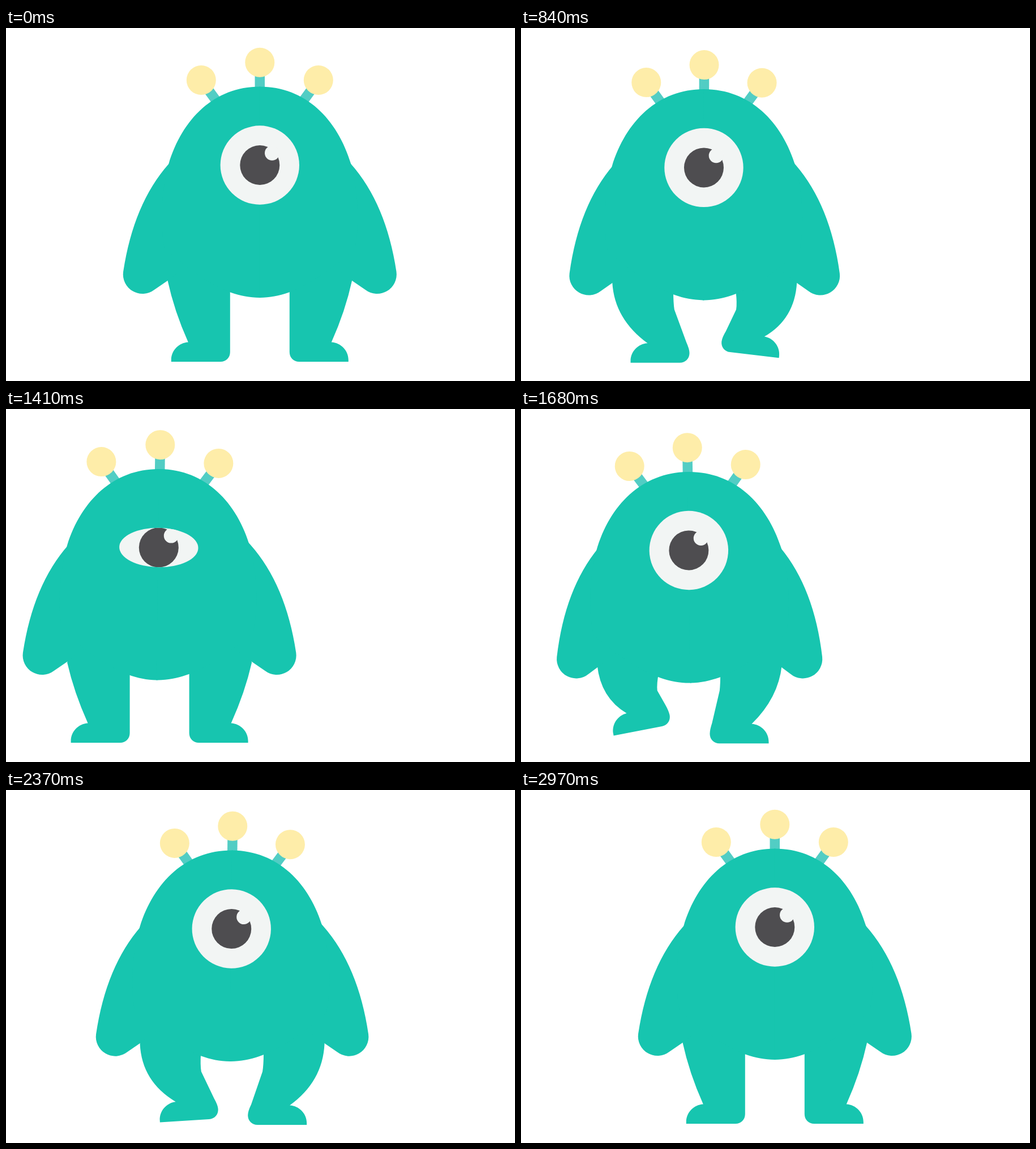
Animation of 899 by 623 pixels, one loop 3600 ms. Source, as an HTML page with a canvas:

```html
<!DOCTYPE html>
<html>
<head>
<meta charset="utf-8">
<style>
html, body { margin: 0; width: 100%; height: 100%; overflow: hidden; background: #fff; }
canvas { display: block; }
</style>
</head>
<body>
<canvas id="stage" width="899" height="623"></canvas>
<script>
const ctx = document.getElementById('stage').getContext('2d');
const GREEN = '#17c5af', STALK = '#52cdc4', BULB = '#feeda9', WHITE = '#f2f5f4', DARK = '#4e4d50';
const TAU = Math.PI * 2, DEG = Math.PI / 180;
const STEP = 30, LOOP = 3600, WALK = 1200, TURN = 1500, HOME = 2700, STRIDE = 600;

// Half shapes, left of the centre line; each is drawn twice, once mirrored.
const torso = new Path2D('M1 103.5H0C-80 103.5-137 160-161 240C-172 280-178 340-168 390C-130 421-70 476 0 476H1Z');
const arm = new Path2D('M-100 300L-143 220L-161 240Q-223 310-241.2 430A34.3 34.3 0 0 0-186.4 462L-163 446L-100 400Z');

function mirrored(draw) {
  for (const side of [1, -1]) {
    ctx.save();
    ctx.scale(side, 1);
    draw(side);
    ctx.restore();
  }
}

function ellipse(x, y, rx, ry, color) {
  ctx.beginPath();
  ctx.ellipse(x, y, rx, ry, 0, 0, TAU);
  ctx.fillStyle = color;
  ctx.fill();
}

function antenna(x, y, dx, dy) {
  ctx.beginPath();
  ctx.moveTo(x, y);
  ctx.lineTo(x + dx, y + dy);
  ctx.lineWidth = 17.5;
  ctx.strokeStyle = STALK;
  ctx.stroke();
  ellipse(x, y, 26, 26, BULB);
}

// bend: 0 straight, 1 knees fully bent; lift: 0 planted, 1 raised
function leg(side, bend, lift, bob) {
  const a = -11.5 * DEG * lift, c = Math.cos(a), s = Math.sin(a);
  const inward = (27 + 1.5 * side) * bend + 3 * lift;
  const knee = -52.5 - 3 * bend - 4 * lift;
  const foot = (x, y) => [
    -104 + inward + (x + 104) * c - (y - 589) * s,
    589 + 2 * bend - 25 * lift + (x + 104) * s + (y - 589) * c
  ];
  ctx.beginPath();
  ctx.moveTo(-54, 400);
  ctx.lineTo(-150, 400);
  ctx.lineTo(-163, 445 + bob);
  ctx.quadraticCurveTo(-151 - 9 * bend, 500 + 15 * bend, ...foot(-126.5, 554.5));
  ctx.bezierCurveTo(...foot(-143, 555.5), ...foot(-156.5, 569), ...foot(-156.5, 586));
  ctx.lineTo(...foot(-156.5, 589));
  ctx.lineTo(...foot(-69.5, 589));
  ctx.bezierCurveTo(...foot(-60, 589), ...foot(-52.5, 582), ...foot(-52.5, 572));
  ctx.quadraticCurveTo(...foot(-52.5, 565), ...foot(-52.5 - 6 * bend, 553));
  ctx.lineTo(knee + 2 * bend, 497);
  ctx.quadraticCurveTo(knee, 485, -52.5 - 3 * bend, 466);
  ctx.closePath();
  ctx.fill();
}

function eye(open) {
  if (open <= 0) return;
  ctx.save();
  ellipse(0, 242, 69.7, 69.7 * open, WHITE);
  ctx.clip();
  ellipse(0, 242, 35, 35, DARK);
  ellipse(21.7, 220.8, 13, 13, WHITE);
  ctx.restore();
}

function blink(t) {
  if (t < 0 || t > 270) return 1;
  return Math.max(0, 1 - t / 120, (t - 150) / 120);
}

function draw(t) {
  // Distance walked in ms: out, pause, the same way back, rest.
  const walked = t <= WALK ? t : t < TURN ? WALK : Math.max(0, HOME - t);
  const moving = walked > 0 ? 1 : 0;
  const phase = TAU * walked / STRIDE;
  const swing = Math.sin(phase), beat = Math.cos(2 * phase);
  const bend = (1 - Math.cos(phase)) / 2;
  const bob = moving * (5.25 - 2.75 * beat);

  ctx.fillStyle = '#fff';
  ctx.fillRect(0, 0, 899, 623);
  ctx.save();
  ctx.translate(448.3 - 177.2 * walked / WALK, 0);

  ctx.fillStyle = GREEN;
  mirrored(side => leg(side, bend, Math.max(0, -side * swing), bob));
  mirrored(() => {
    ctx.translate(-150, 235 + 2.5 * (1 - beat));
    ctx.rotate(-1.1 * DEG * (1 - beat));
    ctx.translate(150, -235);
    ctx.fill(arm);
  });

  ctx.translate(-1.3 * moving, 242 + bob);
  ctx.rotate(moving * (0.9 * beat - 0.1) * DEG);
  ctx.translate(0, -242);
  antenna(0, 60.7, 0, 55);
  mirrored(() => antenna(1.5 * bend - 103.5, 92, 30, 41));
  ctx.fillStyle = GREEN;
  mirrored(() => {
    ctx.scale(1 + 0.0018 * bob, 1);
    ctx.fill(torso);
  });
  eye(Math.min(blink(t - WALK), blink(t - HOME)));
  ctx.restore();
}

function tick(now) {
  draw(Math.floor(now % LOOP / STEP) * STEP);
  requestAnimationFrame(tick);
}
draw(0);
requestAnimationFrame(tick);
</script>
</body>
</html>
```
